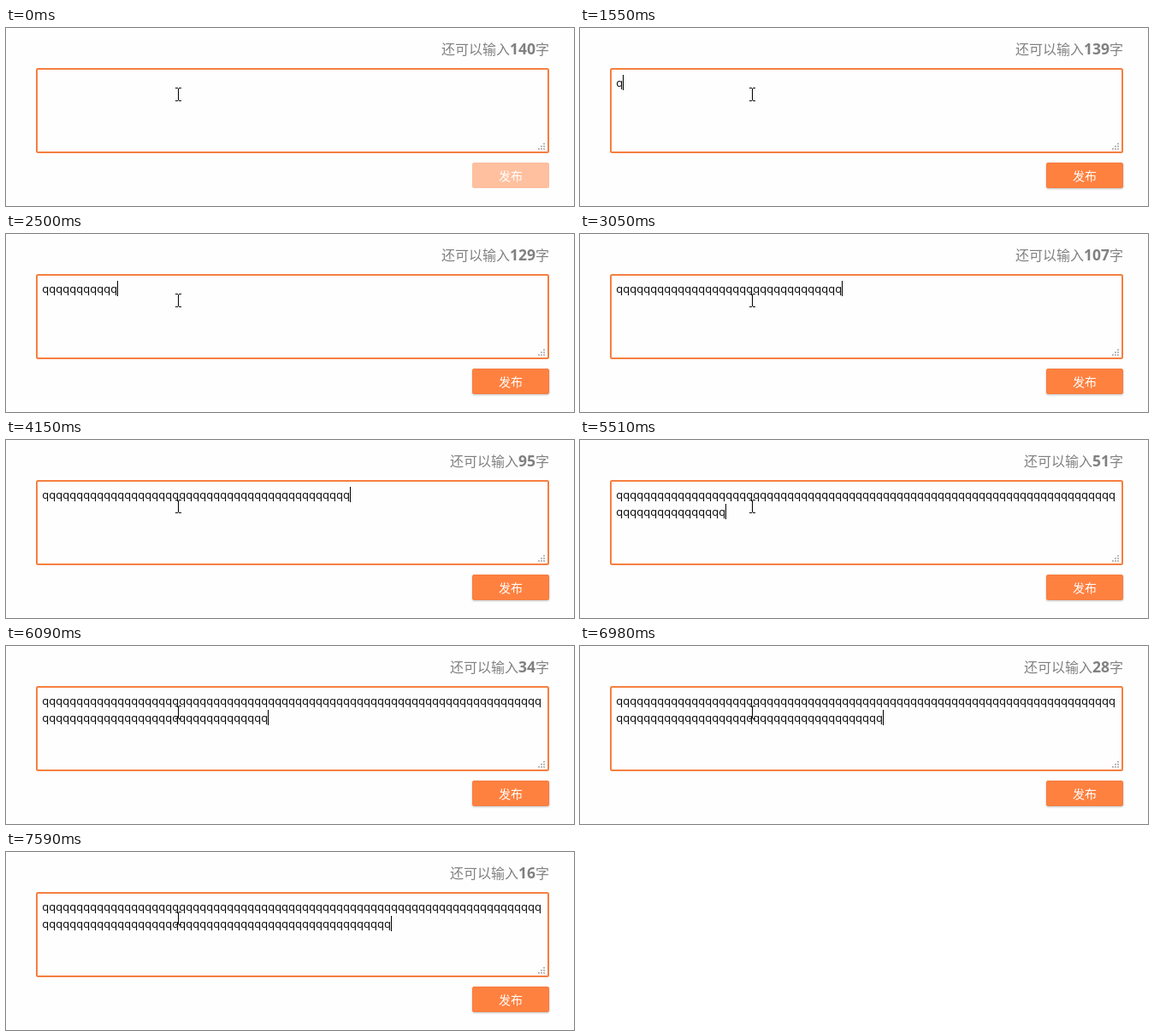
An HTML page that plays this animation: 664x209 px, repeating every 8000 ms.

```html
<!DOCTYPE html>
<html lang="zh-CN">
<head>
<meta charset="utf-8">
<title>还可以输入140字</title>
<style>
  html, body { margin: 0; width: 100%; height: 100%; overflow: hidden; background: #fefefe; }
  svg { display: block; width: 664px; height: 209px; }
  text { font-family: "Noto Sans CJK SC", "Noto Sans CJK", sans-serif; }
  .hint { font-size: 16px; fill: #808080; text-anchor: end; }
  .hint tspan { font: bold 17.5px "Open Sans", "Noto Sans", sans-serif; }
  .line { font: 13.055px "Open Sans", "Noto Sans", sans-serif; }
  .label { font-size: 14px; fill: #fff; text-anchor: middle; }
  .dots { fill: none; stroke: #bbb; stroke-width: 2; stroke-dasharray: 2 1; }
  #button { fill: #ffc09f; stroke: #fbbd9e; }
  #button.on { fill: #ff8140; stroke: #f77c3d; filter: drop-shadow(0 1px 1px rgba(0, 0, 0, .25)); }
  .pointer { fill: none; stroke: #000; }
</style>
</head>
<body>
<svg viewBox="0 0 664 209">
  <text class="hint" x="635" y="31">还可以输入<tspan id="left">140</tspan>字</text>

  <rect x="36" y="48" width="598" height="98" rx="1.5" fill="#fefefe" stroke="#f57f3f" stroke-width="2"/>
  <path class="dots" d="M628 136h2M625 139h5M622 142h8"/>

  <text class="line" x="42.3" y="69"></text>
  <text class="line" x="42.3" y="89"></text>
  <rect id="caret" width="1" height="18" visibility="hidden"/>

  <rect id="button" x="545.5" y="158.5" width="89" height="29" rx="1.5"/>
  <text class="label" x="590" y="179">发布</text>

  <path class="pointer" d="M198 70.5h3m1 0h3M201.5 71v14M198 85.5h3m1 0h3"/>
</svg>
<script>
  const LOOP = 8000, LIMIT = 140, PER_LINE = 73, CELL = 8;
  const RATE = 0.0322;   // repeated keys per ms
  const REFRESH = 135;   // ms between screen updates while a key repeats

  // Each key press: when it lands, when it starts repeating,
  // when the repeat first shows, and the count on release.
  const holds = [
    { press: 1550, repeat: 2080, shows: 2100, end: 35 },
    { press: 3350, repeat: 3880, shows: 3880, end: 107 },
    { press: 6400, repeat: 6880, shows: 6980, end: 123 },
    { press: 7590, repeat: LOOP, shows: LOOP, end: 124 }
  ];

  const left = document.getElementById('left');
  const caret = document.getElementById('caret');
  const button = document.getElementById('button');
  const lines = document.querySelectorAll('.line');

  function countAt(t) {
    let n = 0;
    for (const { press, repeat, shows, end } of holds) {
      if (t < press) return n;
      const first = n + 1;
      if (t < shows) return first;
      const seen = shows + Math.floor((t - shows) / REFRESH) * REFRESH;
      n = Math.min(end, first + 1 + Math.floor((seen - repeat) * RATE));
    }
    return n;
  }

  // The caret blinks off only while no key is down.
  const caretShown = t => (t >= 530 && t < 1120) || (t >= 1550 && t < 6830) || t >= 6980;

  function draw(t) {
    const n = countAt(t);
    const first = Math.min(n, PER_LINE), second = n - first;
    lines[0].textContent = 'q'.repeat(first);
    lines[1].textContent = 'q'.repeat(second);
    left.textContent = LIMIT - n;
    button.classList.toggle('on', n > 0);
    caret.setAttribute('x', 42 + CELL * (second || first));
    caret.setAttribute('y', second ? 75 : 55);
    caret.setAttribute('visibility', caretShown(t) ? 'visible' : 'hidden');
  }

  const start = performance.now();
  function tick() {
    draw((performance.now() - start) % LOOP);
    requestAnimationFrame(tick);
  }
  tick();
</script>
</body>
</html>
```
